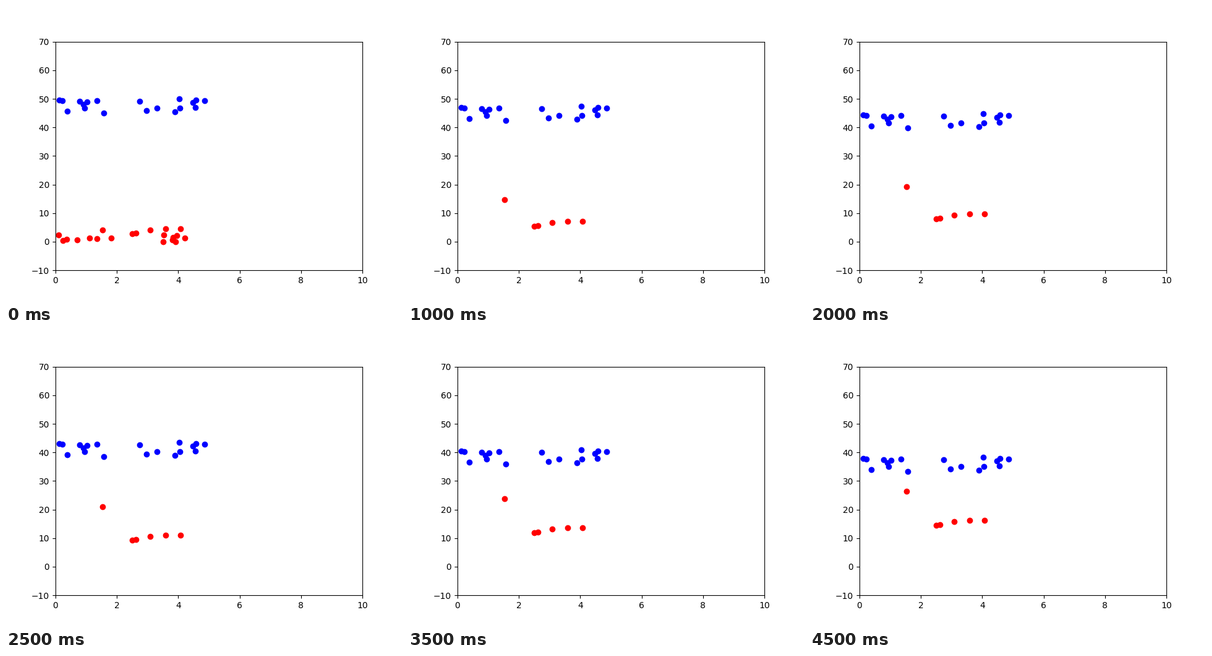
Recreate the animation shown at these times as a matplotlib script. Size 640 by 480 pixels, loop 5000 ms.

```python
import numpy as np
import matplotlib.pyplot as plt
from matplotlib.animation import FuncAnimation

FRAMES = 10
STEP = 1.3      # drift per frame, in data units
BOOST = 10.7    # extra climb of the leading red dot

fig, ax = plt.subplots(figsize=(6.4, 4.8), dpi=100)
ax.set_xlim(0, 10)
ax.set_ylim(-10, 70)


def to_data(points):
    """Convert stage pixels (origin at top left) to axis units."""
    px, py = np.array(points, dtype=float).T
    return (px - 80) / 49.6, (427.2 - py) / 4.62 - 10


blue_x, blue_y = to_data([
    (86, 152), (91, 153), (99, 170), (119, 154), (125, 159), (127, 165),
    (131, 155), (147, 153), (158, 173), (216, 154), (227, 169), (244, 165),
    (273, 171), (280, 150), (281, 165), (302, 156), (306, 164), (307, 152),
    (321, 153),
])

# Red dots grouped by how long they live
leader_x, leader_y = to_data([(156, 362)])
steady_x, steady_y = to_data([
    (204, 368), (210, 367), (233, 362), (258, 360), (282, 360),
])
late_x, late_y = to_data([(269, 378)])
brief_x, brief_y = to_data([
    (85, 370), (92, 379), (98, 377), (115, 378), (135, 375), (147, 376),
    (170, 375), (254, 381), (255, 370), (270, 374), (274, 381), (276, 371),
    (289, 375),
])

blue, = ax.plot([], [], "o", color="blue")
red, = ax.plot([], [], "o", color="red")


def update(n):
    rise = STEP * n
    blue.set_data(blue_x, blue_y - rise)

    xs = [leader_x, steady_x]
    ys = [leader_y + rise + BOOST * (1 - 0.5 ** n), steady_y + rise]
    if n < 2:
        xs.append(late_x)
        ys.append(late_y + rise)
    if n < 1:
        xs.append(brief_x)
        ys.append(brief_y)
    red.set_data(np.concatenate(xs), np.concatenate(ys))
    return blue, red


anim = FuncAnimation(fig, update, frames=FRAMES, interval=500,
                     init_func=lambda: update(0), repeat=True, repeat_delay=0)
plt.show()
```
